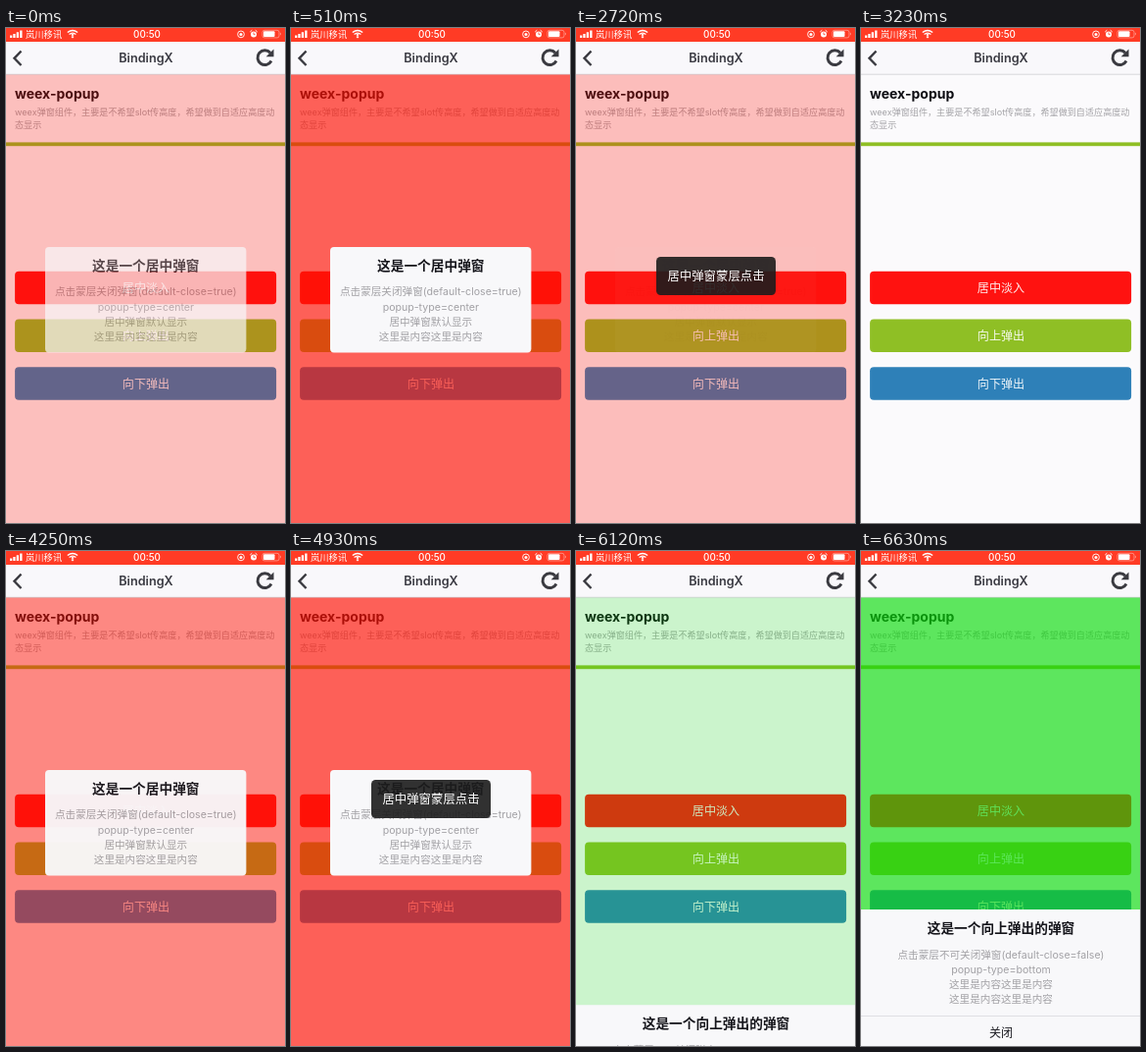
Write an HTML page that moves like this. It is 285x504 px and loops after 8 s.

```html
<!DOCTYPE html>
<html lang="zh-CN">
<head>
<meta charset="utf-8">
<title>weex-popup</title>
<style>
html, body { margin: 0; width: 100%; height: 100%; overflow: hidden; background: #fbfafc; }
svg { display: block; width: 100%; height: 100%; font-family: Inter, "Noto Sans CJK SC", "Noto Sans CJK", sans-serif; }
.mid { text-anchor: middle; }
.label { font-size: 12.1px; fill: #fff; fill-opacity: .92; text-anchor: middle; }
.title { font-size: 13.7px; font-weight: 600; fill: #16161c; text-anchor: middle; }
.note { font-size: 10.6px; fill: #a2a1a5; text-anchor: middle; }
.desc { font-size: 9.1px; fill: #a5a4a8; }
</style>
</head>
<body>
<svg viewBox="0 0 285 504">
  <rect width="285" height="504" fill="#fbfafc"/>

  <text x="9" y="72" font-size="14" font-weight="700" fill="#0c0c12">weex-popup</text>
  <text class="desc" x="9" y="89">weex弹窗组件，主要是不希望slot传高度，希望做到自适应高度动</text>
  <text class="desc" x="9" y="102">态显示</text>
  <rect y="116.4" width="285" height="3.8" fill="#8fbf25"/>

  <g id="buttons"></g>

  <rect id="redMask" y="47" width="285" height="457" fill="#ff1204"/>
  <rect id="greenMask" y="47" width="285" height="457" fill="#0adc0a"/>

  <g id="center">
    <rect x="40" y="223" width="205.4" height="107.6" rx="4" fill="#f8f8fa"/>
    <text class="title" x="142.8" y="247">这是一个居中弹窗</text>
    <text class="note" x="142.8" y="272">点击蒙层关闭弹窗(default-close=true)</text>
    <text class="note" x="142.8" y="287.5">popup-type=center</text>
    <text class="note" x="142.8" y="303">居中弹窗默认显示</text>
    <text class="note" x="142.8" y="318">这里是内容这里是内容</text>
  </g>

  <g id="bottom">
    <rect y="365" width="285" height="140" fill="#f8f8fa"/>
    <text class="title" x="143" y="389">这是一个向上弹出的弹窗</text>
    <text class="note" x="143" y="414.5">点击蒙层不可关闭弹窗(default-close=false)</text>
    <text class="note" x="143" y="430">popup-type=bottom</text>
    <text class="note" x="143" y="445">这里是内容这里是内容</text>
    <text class="note" x="143" y="460">这里是内容这里是内容</text>
    <path d="M0 473.5H285" stroke="#dfdfe3"/>
    <text class="mid" x="143" y="495" font-size="12.1" fill="#1c1c22">关闭</text>
  </g>

  <g id="toast">
    <rect x="-61" y="-19.5" width="122" height="39" rx="4.5" fill="#1c1c1c" fill-opacity=".9"/>
    <text class="mid" y="4.5" font-size="12.4" fill="#fff">居中弹窗蒙层点击</text>
  </g>

  <!-- navigation bar -->
  <rect y="14" width="285" height="33" fill="#f9f8fb"/>
  <path d="M0 47.2H285" stroke="#c9c8cd" stroke-width=".7"/>
  <path d="M15.5 23.5L8.5 30.8L15.5 38" fill="none" stroke="#3a3a40" stroke-width="2.4"/>
  <text class="mid" x="143" y="35.2" font-size="12.7" font-weight="600" fill="#3a3a42">BindingX</text>
  <path d="M270 25.3A7.4 7.4 0 1 0 271 33.5" fill="none" stroke="#3a3a40" stroke-width="2.9"/>
  <path d="M273.5 21.5V29.3H265.7Z" fill="#3a3a40"/>

  <!-- status bar -->
  <rect width="285" height="14" fill="#ff3b25"/>
  <g fill="#fff">
    <path d="M4 7.5h2.3v2.5H4zM7.3 6h2.3v4H7.3zM10.7 4.3H13V10h-2.3zM14.2 2.5h2.3V10h-2.3z"/>
    <text x="20" y="10" font-size="9.3">岚川移讯</text>
    <text class="mid" x="144" y="10" font-size="9.8" font-weight="500">00:50</text>
    <path d="M68 8.3L66.3 6.7Q68 5.4 69.7 6.7ZM68 10.4L66.5 8.9Q68 7.7 69.5 8.9Z"/>
    <rect x="263" y="3.3" width="11.5" height="5.6" rx="1"/>
    <path d="M280 4.6q1.8 1.5 0 3z" opacity=".6"/>
    <circle cx="240" cy="6.4" r="1.5"/>
    <circle cx="253" cy="6.5" r="3"/>
  </g>
  <g fill="none" stroke="#fff">
    <path d="M62.8 4.6Q68 .4 73.2 4.6M64.6 6.5Q68 3.6 71.4 6.5" stroke-width="1.3"/>
    <circle cx="240" cy="6.4" r="3.4" stroke-width=".9"/>
    <path d="M249.3 4l2-1.8M256.7 4l-2-1.8" stroke-width="1"/>
    <rect x="262" y="2.3" width="17" height="7.6" rx="2" stroke-width=".8" opacity=".5"/>
  </g>
  <path d="M253 4.5V6.7H254.7" fill="none" stroke="#ff3b25" stroke-width=".8"/>
</svg>
<script>
const LOOP = 8000, STEP = 170;
const $ = id => document.getElementById(id);

$("buttons").innerHTML = [["居中淡入", "#ff1210"], ["向上弹出", "#8fbf25"], ["向下弹出", "#2e80b8"]]
  .map(([text, color], i) => {
    const y = 247.8 + i * 48.7;
    return `<rect x="9.1" y="${y}" width="267" height="33.5" rx="4" fill="${color}"/>
      <text class="label" x="143" y="${y + 21.5}">${text}</text>`;
  }).join("");

const part = (t, start, span) => Math.min(1, Math.max(0, (t - start) / span));
const easeOut = (x, power) => 1 - (1 - x) ** power;

// Each centred popup: fade in, fade out, toast on, toast shrinking away
const shows = [
  { from: -130, inSpan: 600, leave: 2480, outSpan: 400, toast: 2550, shrink: 2960 },
  { from: 4081, inSpan: 345, leave: 4930, outSpan: 340, toast: 4930, shrink: 5170 }
];

function render(t) {
  const s = shows[t < 4000 ? 0 : 1];
  const enter = part(t, s.from, s.inSpan);
  const stay = 1 - part(t, s.leave, s.outSpan);
  $("redMask").setAttribute("opacity", .66 * easeOut(enter, 2) * stay);
  $("center").setAttribute("opacity", easeOut(enter, 5) * stay ** 4);

  const gone = part(t, s.shrink, 200);
  $("toast").setAttribute("opacity", t >= s.toast && gone < 1 ? 1 - .2 * gone : 0);
  $("toast").setAttribute("transform", `translate(143 252.5) scale(${1 - .4 * gone})`);

  const rise = easeOut(part(t, 6020, 600), 2);
  $("greenMask").setAttribute("opacity", .65 * rise);
  $("bottom").setAttribute("transform", `translate(0 ${140 * (1 - rise)})`);
}

const begin = performance.now();
function tick() {
  const t = (performance.now() - begin) % LOOP;
  render(Math.floor(t / STEP) * STEP);
  requestAnimationFrame(tick);
}
tick();
</script>
</body>
</html>
```
